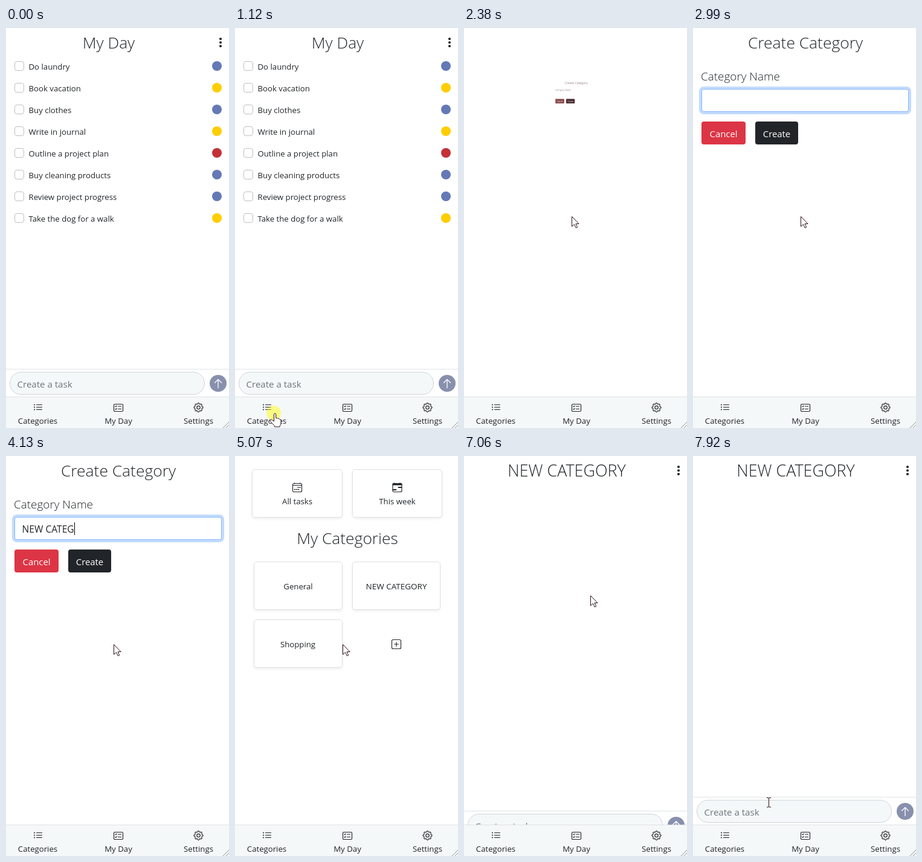
Write an HTML page that moves like this. It is 369x663 px and loops after 7990 ms.

```html
<!DOCTYPE html>
<html lang="en">
<head>
<meta charset="utf-8">
<title>My Day</title>
<style>
  html, body { margin: 0; width: 100%; height: 100%; overflow: hidden; background: #fff; }
  svg { display: block; }
  text { font: 13.2px "Open Sans", "Noto Sans", sans-serif; fill: #212529; white-space: pre; }
  .mid { text-anchor: middle; }
  .h { font-size: 26.4px; font-weight: 300; }
  .h.caps { font-size: 26.9px; }
  .caps { font-size: 13.5px; }
  .lead { font-size: 18.9px; font-weight: 300; }
  .body { font-size: 15.1px; }
  .typed { font-size: 15.6px; }
  .white { fill: #fff; font-size: 14.9px; font-weight: 500; }
  .muted { fill: #6c757d; }
  .icon { fill: none; stroke: #212529; stroke-width: 1.15; stroke-linecap: round; stroke-linejoin: round; }
  .solid { fill: #212529; stroke: none; }
  .card { fill: #fff; stroke: #dee0e2; filter: drop-shadow(0 2px 2px rgba(0, 0, 0, .07)); }
  .rule { stroke: #dee2e6; }
  .cursor { fill: #fff; stroke: #2e1217; stroke-linejoin: round; }
  .cancel { fill: #dc3545; }
  .create { fill: #212529; }
  .far .field { display: none; }
  .far .cancel { fill: #884a4a; }
  .far .create { fill: #4a2c30; }
  .far .label { fill: #6b3f42; }
</style>
</head>
<body>
<svg width="369" height="663" viewBox="0 0 369 663">
  <defs>
    <g id="plus" class="icon">
      <rect x="-7.5" y="-7.5" width="15" height="15" rx="2"/>
      <path d="M-3.5 0h7M0-3.5v7"/>
    </g>
    <g id="kebab" class="solid">
      <circle cx="355" cy="18" r="2.1"/><circle cx="355" cy="24" r="2.1"/><circle cx="355" cy="30" r="2.1"/>
    </g>
  </defs>

  <g id="day">
    <text class="h mid" x="170" y="34">My Day</text>
    <use href="#kebab"/>
    <g id="tasks"></g>
  </g>

  <g id="cats">
    <rect class="card" x="28.5" y="22.5" width="149" height="79" rx="4.5"/>
    <rect class="card" x="194.5" y="22.5" width="148" height="79" rx="4.5"/>
    <g class="icon" transform="translate(95 44)">
      <rect x=".5" y="1.5" width="15" height="14" rx="2"/>
      <path d="M1 4.5h14M3.5.5v1M12.5.5v1"/>
      <path d="M9 8h1M12 8h1M3.5 11.5h1M6.5 11.5h1M9.5 11.5h1" stroke-width="1.6"/>
    </g>
    <g class="icon" transform="translate(260.5 44)">
      <rect x=".5" y="1.5" width="15" height="14" rx="2"/>
      <path class="solid" d="M0 4.6V3q0-2 2-2h1V0h1v1h8V0h1v1h1q2 0 2 2v1.6z"/>
      <path d="M10 8h5M1 12h5" stroke-width="1.8"/>
    </g>
    <text class="mid" x="103" y="80">All tasks</text>
    <text class="mid" x="268.5" y="80">This week</text>
    <text class="h mid" x="186" y="146">My Categories</text>
    <rect class="card" x="31.5" y="175.5" width="146" height="79" rx="4.5"/>
    <rect class="card" x="194.5" y="175.5" width="145" height="79" rx="4.5"/>
    <text class="mid" x="104.5" y="221">General</text>
    <g id="before">
      <text class="mid" x="267" y="221">Shopping</text>
      <use href="#plus" x="186" y="312"/>
    </g>
    <g id="after">
      <text class="mid caps" x="267" y="221">NEW CATEGORY</text>
      <rect class="card" x="31.5" y="271.5" width="146" height="79" rx="4.5"/>
      <text class="mid" x="104" y="317">Shopping</text>
      <use href="#plus" x="267" y="312"/>
    </g>
  </g>

  <g id="form">
    <text class="h mid label" x="186" y="34">Create Category</text>
    <text class="lead label" x="13" y="87">Category Name</text>
    <g class="field">
      <rect x="10" y="97" width="351" height="46" rx="8" fill="#c2dbfe"/>
      <rect x="14.5" y="101.5" width="342" height="37" rx="3.5" fill="#fff" stroke="#86b7fe"/>
      <text id="typed" class="typed" x="26.5" y="127"></text>
      <rect id="caret" y="110" width="1" height="21"/>
    </g>
    <rect class="cancel" x="14" y="155" width="73" height="38" rx="4"/>
    <rect class="create" x="103" y="155" width="71" height="38" rx="4"/>
    <text class="white mid" x="50.5" y="181">Cancel</text>
    <text class="white mid" x="138.5" y="181">Create</text>
  </g>

  <g id="fresh">
    <text class="h caps mid" x="170" y="34">NEW CATEGORY</text>
    <use href="#kebab"/>
  </g>

  <g id="bar">
    <rect y="565" width="369" height="46" fill="#fff"/>
    <path class="rule" d="M0 565.5h369"/>
    <rect x="6.5" y="570.5" width="322" height="37" rx="18.5" fill="#f5f8f8" stroke="#ced4da"/>
    <text class="body muted" x="18.5" y="596">Create a task</text>
    <circle cx="351" cy="589" r="14" fill="#8890ad"/>
    <path d="M351 596.5V582.5M345.5 588l5.5-5.5 5.5 5.5" fill="none" stroke="#fff" stroke-width="1.3" stroke-linecap="round" stroke-linejoin="round"/>
  </g>

  <g>
    <rect y="611" width="369" height="52" fill="#f5f8f8"/>
    <path class="rule" d="M0 611.5h369"/>
    <g class="icon" transform="translate(45 621)">
      <path d="M5.5 3.5h9M5.5 7.5h9M5.5 11.5h9"/>
      <path d="M2 3.5h.01M2 7.5h.01M2 11.5h.01" stroke-width="2"/>
    </g>
    <g class="icon" transform="translate(178 621)">
      <rect x=".5" y="2.5" width="15" height="12" rx="1.5"/>
      <path d="M7.5 6h5M7.5 10.5h5M3 6l.8.8L5.3 5M3 10.5l.8.8 1.5-1.8"/>
    </g>
    <g class="icon" transform="translate(318.5 629)">
      <path id="gear"/><circle r="2.7"/>
    </g>
    <text class="mid" x="52.5" y="656">Categories</text>
    <text class="mid" x="186" y="656">My Day</text>
    <text class="mid" x="318.5" y="656">Settings</text>
    <path d="M359 663l10-10M364 663l5-5" stroke="#8d9092"/>
  </g>

  <circle id="click" r="12" fill="#ff0" fill-opacity=".47"/>
  <g id="pointer" class="cursor">
    <path id="arrow" d="M.5.5V17l4-3.7 2.7 6 2.5-1.1-2.6-5.7h5z"/>
    <path id="hand" d="M.5 2.5a1.6 1.6 0 0 1 3.2 0V8.5q2.6-.8 3.2 1 2.4-.6 3 1.2 2.1-.2 2.1 2V17q0 2.5-1.8 4.5V23H1.5v-1.5L-5.5 14q-1.2-1.8.4-2.8 1.6-.6 3 .9L.5 14z"/>
    <path id="beam" fill="none" d="M-3-7.5h2q1.5 0 1.5 1.5 0-1.5 1.5-1.5h2M.5-6V6.5M-3 8h2q1.5 0 1.5-1.5 0 1.5 1.5 1.5h2"/>
  </g>
</svg>

<script>
const LOOP = 7990;
const $ = id => document.getElementById(id);
const show = (id, on) => { $(id).style.display = on ? '' : 'none'; };
const place = (id, x, y) => $(id).setAttribute('transform', `translate(${x} ${y})`);
const within = (t, a, b) => t >= a && t < b;

// How many of n evenly spaced steps, the first at a and the last at b, have happened.
const stage = (t, a, b, n) =>
  t < a ? 0 : Math.min(n, 1 + Math.floor((t - a) / (b - a) * (n - 1) + 1e-6));

const BLUE = '#6479b5', YELLOW = '#ffcd00', RED = '#c23237';
const tasks = [
  ['Do laundry', BLUE], ['Book vacation', YELLOW], ['Buy clothes', BLUE],
  ['Write in journal', YELLOW], ['Outline a project plan', RED],
  ['Buy cleaning products', BLUE], ['Review project progress', BLUE],
  ['Take the dog for a walk', YELLOW]
];
$('tasks').innerHTML = tasks.map(([name, color], i) => `
  <g transform="translate(0 ${36 * i})">
    <rect x="14.5" y="55.5" width="15" height="15" rx="3.5" fill="#fff" stroke="#bfbfbf"/>
    <text x="37.5" y="69">${name}</text>
    <circle cx="349" cy="63" r="8" fill="${color}"/>
  </g>`).join('');

$('gear').setAttribute('d', 'M' + Array.from({ length: 64 }, (_, i) => {
  const a = i / 32 * Math.PI, r = 6.7 + 0.85 * Math.cos(8 * a);
  return `${(r * Math.sin(a)).toFixed(2)} ${(-r * Math.cos(a)).toFixed(2)}`;
}).join('L') + 'Z');

function zoom(id, cy, t, a, b, sizes) {
  const s = sizes[Math.max(0, stage(t, a, b, sizes.length) - 1)];
  $(id).setAttribute('transform', `translate(185.5 ${cy}) scale(${s}) translate(-185.5 ${-cy})`);
  $(id).classList.toggle('far', s < 0.5);
}

// start, end, steps, from x, from y, to x, to y
const moves = [
  [790, 930, 3, 78, 660, 64, 638],
  [1590, 2050, 8, 64, 638, 178, 312],
  [6070, 6460, 7, 178, 312, 209, 231],
  [7460, 7920, 8, 209, 231, 125, 574]
];

function drawPointer(t) {
  const move = moves.filter(m => t >= m[0]).pop();
  show('pointer', move);
  show('click', within(t, 1120, 1260) || within(t, 2320, 2380) || within(t, 6600, 6730));
  if (!move) return;
  const [a, b, n, x0, y0, x1, y1] = move;
  const p = stage(t, a, b, n) / n, e = p * p * (3 - 2 * p);
  const x = Math.round(x0 + (x1 - x0) * e), y = Math.round(y0 + (y1 - y0) * e);
  const kind = y >= 611 ? 'hand' : y > 566 ? 'beam' : 'arrow';
  ['arrow', 'hand', 'beam'].forEach(k => show(k, k === kind));
  place('pointer', x, y);
  place('click', x, y);
}

function drawTyping(t) {
  const count = stage(t, 3200, 3600, 6) + stage(t, 3860, 3930, 2) +
    [0, 1, 3, 4][stage(t, 4130, 4330, 3)];
  $('typed').textContent = 'NEW CATEGORY'.slice(0, count);
  const width = count ? $('typed').getComputedTextLength() : 0;
  $('caret').setAttribute('x', Math.round(27 + Math.max(0, width - 0.5)));
  show('caret', within(t, 2590, 2990) || t >= 3200);
}

function draw(t) {
  show('day', t < 1260);
  show('cats', within(t, 1260, 2380) || within(t, 4800, 6730));
  show('before', t < 4800);
  show('after', t >= 4800);
  show('form', within(t, 2380, 4800));
  show('fresh', t >= 6730);
  show('bar', t < 1260 || t >= 6865);

  if (t < 4800) zoom('cats', 180, t, 1260, 1390, [.5, .8, 1]);
  else zoom('cats', 180, t, 4800, 5070, [.1, .3, .6, .8, 1]);
  zoom('form', 108, t, 2380, 2590, [.2, .6, .88, 1]);
  zoom('fresh', 28, t, 6730, 6930, [.2, .6, .88, 1]);
  place('bar', 0, t < 1260 ? 0 : 46 * (1 - stage(t, 6865, 7320, 8) / 8));

  if (within(t, 2380, 4800)) drawTyping(t);
  drawPointer(t);
}

const start = performance.now();
function tick() {
  draw((performance.now() - start) % LOOP);
  requestAnimationFrame(tick);
}
tick();
</script>
</body>
</html>
```
